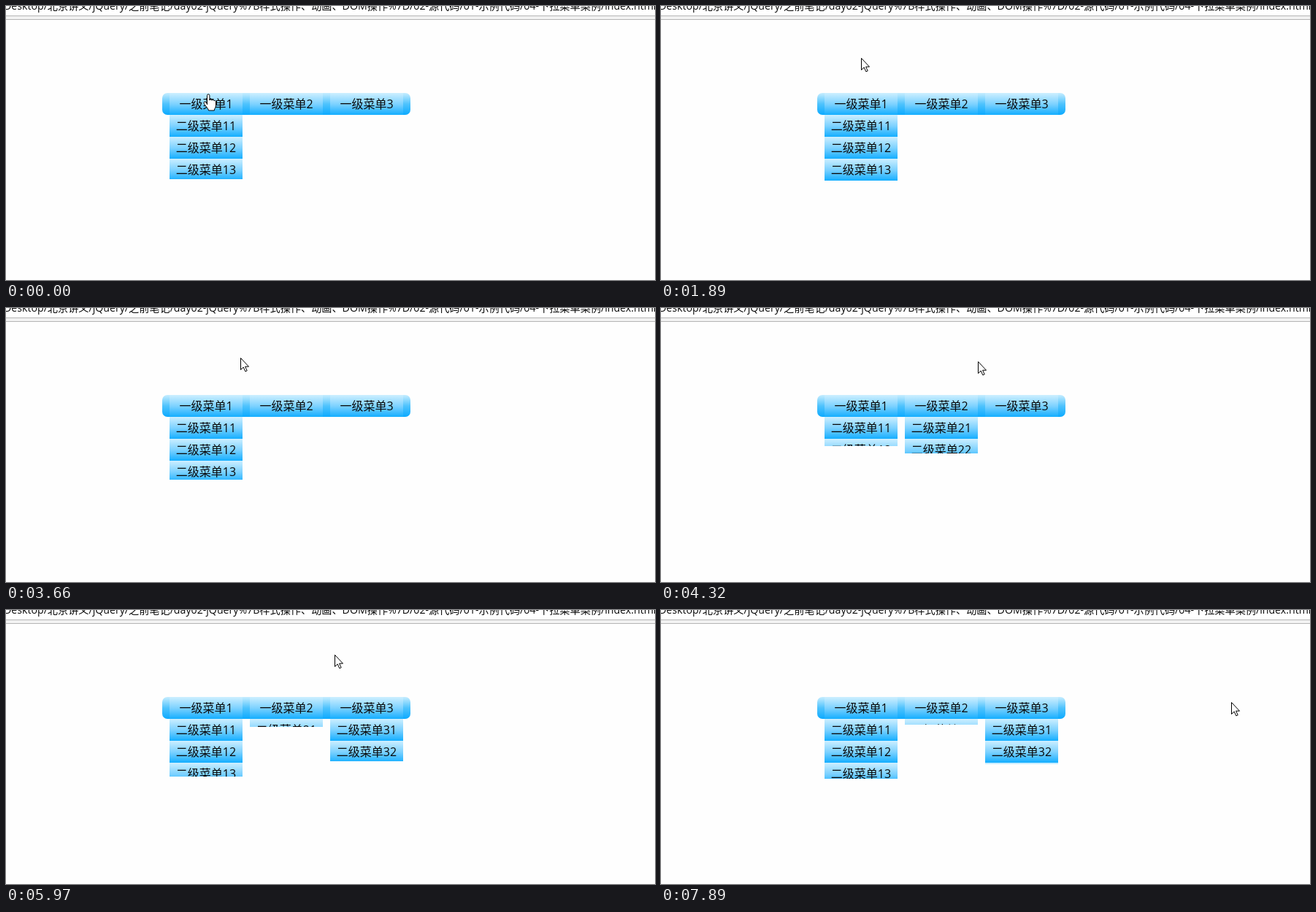
An HTML page that plays this animation: 889x375 px, repeating every 8 s.

```html
<!DOCTYPE html>
<html lang="zh-CN">
<head>
<meta charset="utf-8">
<title>下拉菜单</title>
<style>
html, body { margin: 0; width: 100%; height: 100%; overflow: hidden; background: #fefefe; }
body { position: relative; color: #0a0a0a; font: 16px/30px "Open Sans", "Noto Sans CJK SC", "Noto Sans CJK", sans-serif; }
.bar { position: absolute; left: 0; top: 0; width: 889px; height: 13px; overflow: hidden; background: #fff; font-size: 14.16px; line-height: 20px; white-space: nowrap; }
.bar span { position: absolute; left: -3px; top: -10px; }
.edge { position: absolute; left: 0; top: 13px; width: 889px; height: 4px; background: #f2f2f2; border: solid #b6b6b6; border-width: 1px 0; }
.nav { position: absolute; left: 214px; top: 119px; width: 340px; height: 30px; border-radius: 7px; background: linear-gradient(#c6edff, #4fc3fd 50%, #0caaff); }
.menu { position: absolute; top: 0; width: 100px; text-align: center; }
.item { height: 30px; background: linear-gradient(#cdefff, #7bd1ff 52%, #14aeff); }
.list { overflow: hidden; }
svg { position: absolute; left: 0; top: 0; overflow: visible; fill: #fff; stroke: #000; }
</style>
</head>
<body>
<div class="bar"><span>Desktop/北京讲义/jQuery/之前笔记/day02-jQuery%7B样式操作、动画、DOM操作%7D/02-源代码/01-示例代码/04-下拉菜单案例/index.html</span></div>
<div class="edge"></div>
<div class="nav"></div>
<svg id="cursor" width="20" height="26">
  <path id="arrow" d="M.5 .5V16.5L4.2 13L6.8 18.8L9.2 17.8L6.6 12.2H11.5Z"/>
  <path id="hand" transform="translate(-7 -1)" d="M5.5 15V2.5a1.7 1.7 0 0 1 3.4 0V9c0-1.5 3-1.5 3.2.3.3-1.3 2.8-1 3 .6.5-1 2.4-.7 2.4 1V16c0 3-2 4-2.2 7H7.5C7 20 4 18 1.5 14c-1.5-2.5.8-3.8 2.3-2.2L5.5 14"/>
</svg>
<script>
const LOOP = 8000, CYCLE = 1950, FULL = 90, MENU_Y = 126;
const nav = document.querySelector('.nav');
const item = text => `<div class="item">${text}</div>`;
const wave = p => Math.sin(Math.PI * p) ** 2;

// Each list slides down and up without pause from its start time.
const lists = [-1076, 3801, 4602].map((start, i) => {
  const n = i + 1, menu = document.createElement('div');
  menu.className = 'menu';
  menu.style.left = 10 + 110 * i + 'px';
  menu.innerHTML = item('一级菜单' + n) +
    `<div class="list">${[1, 2, 3].map(k => item('二级菜单' + n + k)).join('')}</div>`;
  nav.append(menu);
  return { start, el: menu.lastChild };
});

// Pointer rests: time, x, y. Between two rests it dips onto the menu.
const rests = [[0, 277, 121], [1090, 275, 99], [1740, 274, 59], [2830, 272, 50], [3500, 310, 36],
  [4320, 434, 73], [5140, 426, 51], [6000, 450, 60], [6790, 445, 59], [7640, 781, 127], [LOOP, 781, 127]];

function pointer(t) {
  const i = rests.findIndex(r => r[0] > t);
  const [t0, x0, y0] = rests[i - 1], [t1, x1, y1] = rests[i];
  const p = (t - t0) / (t1 - t0), ease = wave(p / 2);
  const y = y0 + (y1 - y0) * ease;
  return [x0 + (x1 - x0) * ease, y + (MENU_Y - y) * wave(p)].map(Math.round);
}

function draw(t) {
  for (const { start, el } of lists)
    el.style.height = Math.round(FULL * wave(Math.max(0, t - start) / CYCLE)) + 'px';
  const [x, y] = pointer(t);
  const over = y >= 119 && y < 149 && x >= 224 && x < 544 && (x - 224) % 110 < 100;
  cursor.style.transform = `translate(${x}px, ${y}px)`;
  hand.style.display = over ? '' : 'none';
  arrow.style.display = over ? 'none' : '';
}

const began = performance.now();
function tick() {
  draw((performance.now() - began) % LOOP);
  requestAnimationFrame(tick);
}
tick();
</script>
</body>
</html>
```
